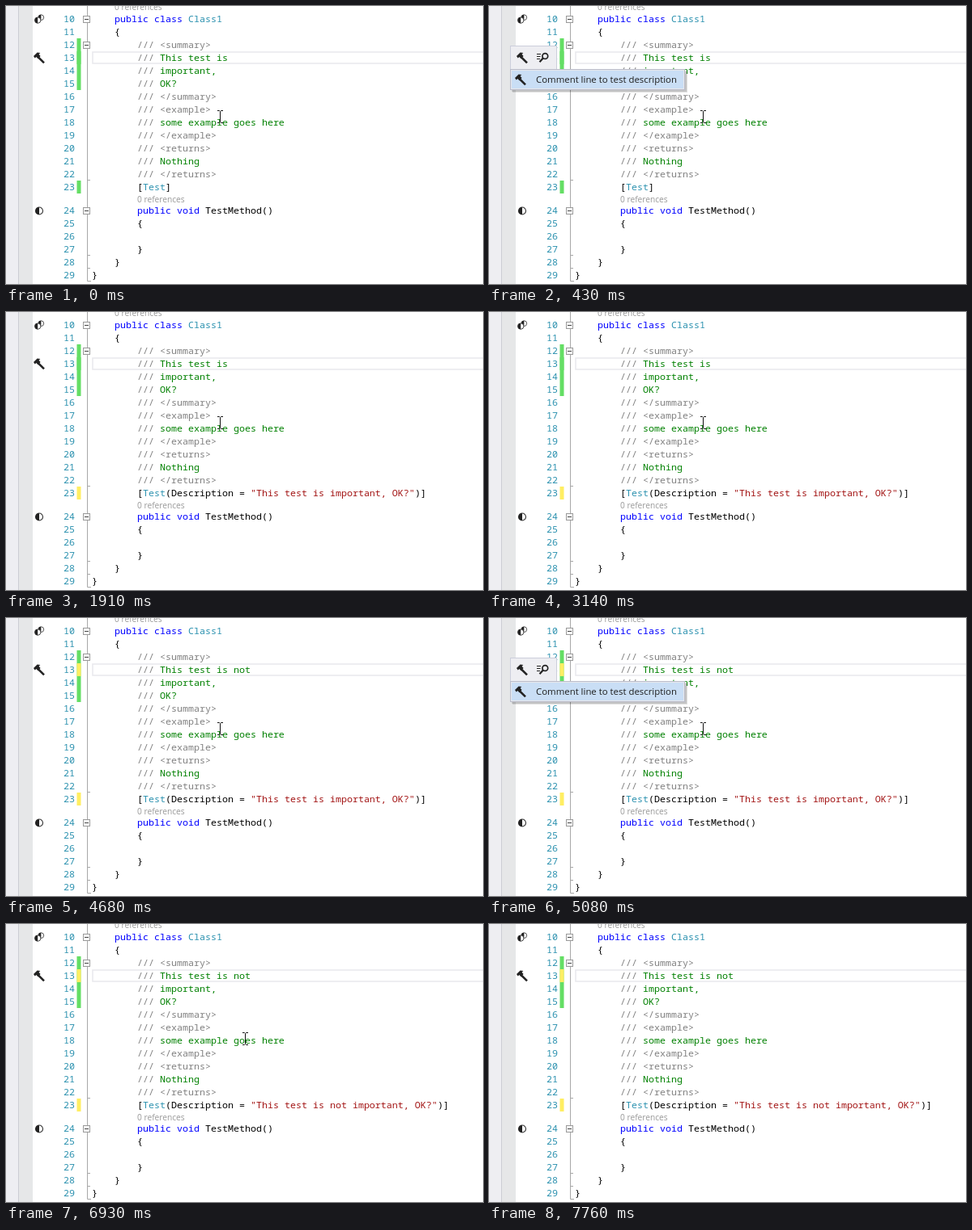
Write an HTML page that moves like this. It is 589x344 px and loops after 8.32 s.

```html
<!DOCTYPE html>
<html lang="en">
<head>
<meta charset="utf-8">
<title>Comment line to test description</title>
<style>
  html, body { margin: 0; width: 100%; height: 100%; overflow: hidden; background: #fff; }
  svg { display: block; }
  text { white-space: pre; }
  .code { font: 11.667px "Noto Sans Mono", "DejaVu Sans Mono", monospace; }
  .ui { font-family: "Open Sans", "Noto Sans", sans-serif; }
  .k { fill: #0000ff; }
  .t { fill: #2b91af; }
  .c { fill: #008000; }
  .x { fill: #808080; }
  .s { fill: #a31515; }
  .b { fill: #000; }
</style>
</head>
<body>
<svg width="589" height="344" viewBox="0 0 589 344">
  <defs>
    <g id="hammer">
      <path d="M40 63.5L47 70.3" stroke="#222" stroke-width="2.5" fill="none"/>
      <path d="M34 62L38.6 57.6L42.3 58L40.6 59.8L42.6 62L39.4 65.2L37.4 63L35.7 64.5Z" fill="#222"/>
    </g>
    <g id="half">
      <circle r="4.5" fill="#fff" stroke="#333" stroke-width="1.1"/>
      <path d="M0 -4.5A4.5 4.5 0 0 0 0 4.5Z" fill="#222"/>
    </g>
    <g id="fold">
      <rect x="-4" y="-4" width="8" height="8" fill="#fff" stroke="#999"/>
      <path d="M-2.5 0H2.5" stroke="#444"/>
    </g>
  </defs>

  <rect width="15" height="344" fill="#eeeef2"/>
  <rect x="15" width="1" height="344" fill="#cccdd4"/>
  <rect x="16" width="17" height="344" fill="#e6e7e8"/>

  <rect x="107" y="57" width="500" height="14" fill="none" stroke="#eaeaee" stroke-width="1.6"/>

  <path d="M100.5 0V340.5H105M100.5 215.5H104M100.5 308.5H104M100.5 324.5H104" fill="none" stroke="#a8a8a8"/>
  <use href="#fold" x="99.5" y="16.5"/>
  <use href="#fold" x="99.5" y="48.5"/>
  <use href="#fold" x="99.5" y="253.5"/>

  <use href="#half" x="41" y="253.5"/>
  <use href="#half" transform="translate(43.3 14.2) scale(.75)"/>
  <use href="#half" transform="translate(39.2 17.6) scale(.82)"/>

  <rect x="87.5" y="40" width="5" height="64" fill="#64de64"/>
  <rect id="bar13" x="87.5" y="56" width="5" height="16"/>
  <rect id="bar23" x="87.5" y="216" width="5" height="16"/>

  <g class="ui" font-size="10.2" fill="#999">
    <text x="134" y="5">0 references</text>
    <text x="162" y="243">0 references</text>
  </g>
  <g id="code" class="code"></g>
  <use id="mark" href="#hammer"/>
  <rect id="caret" y="56" width="1" height="15"/>

  <g id="popup">
    <rect x="29" y="81" width="216" height="26" fill="#000" opacity=".13"/>
    <rect x="28" y="80" width="216" height="26" fill="#000" opacity=".12"/>
    <rect x="26.5" y="49.5" width="57" height="30" fill="#eeeef2" stroke="#cccedb"/>
    <rect x="26.5" y="78.5" width="215" height="25" fill="#e7e8ec" stroke="#b9bccb"/>
    <rect x="28" y="80" width="212" height="22" fill="#c9def5"/>
    <use href="#hammer"/>
    <use href="#hammer" x="-2" y="27"/>
    <g fill="none" stroke="#222">
      <circle cx="69.3" cy="62" r="3.4" stroke-width="1.7"/>
      <path d="M66.8 64.6L62.5 69.3" stroke-width="2.2"/>
      <path d="M59 59.5H64M59 62.5H63.5M59 65.5H63"/>
    </g>
    <text class="ui" x="58" y="95" font-size="11.4" fill="#1e1e1e">Comment line to test description</text>
  </g>

  <path id="mouse" d="M0 .5H2.5L3.5 1.5L4.5 .5H7M3.5 1.5V14.5M0 15.5H2.5L3.5 14.5L4.5 15.5H7" fill="none" stroke="#111"/>
</svg>
<script>
const LOOP = 8320, COL = 7, LEFT = 106;
const GREEN = '#64de64', YELLOW = '#ffee62';
const $ = id => document.getElementById(id);

// Each line: [column, class, text] tokens.
const doc = (text, cls) => [[8, 'x', '///'], [12, cls, text]];
const lines = {
  10: [[4, 'k', 'public'], [11, 'k', 'class'], [17, 't', 'Class1']],
  11: [[4, 'b', '{']],
  12: doc('<summary>', 'x'),
  13: doc('', 'c'),
  14: doc('important,', 'c'),
  15: doc('OK?', 'c'),
  16: doc('</summary>', 'x'),
  17: doc('<example>', 'x'),
  18: doc('some example goes here', 'c'),
  19: doc('</example>', 'x'),
  20: doc('<returns>', 'x'),
  21: doc('Nothing', 'c'),
  22: doc('</returns>', 'x'),
  23: [],
  24: [[8, 'k', 'public'], [15, 'k', 'void'], [20, 'b', 'TestMethod()']],
  25: [[8, 'b', '{']],
  26: [],
  27: [[8, 'b', '}']],
  28: [[4, 'b', '}']],
  29: [[0, 'b', '}']]
};

const baseline = n => n < 24 ? 20 + 16 * (n - 10) : 257 + 16 * (n - 24);

function addText(parent, x, y, cls, str) {
  const el = document.createElementNS('http://www.w3.org/2000/svg', 'text');
  el.setAttribute('x', x);
  el.setAttribute('y', y);
  el.setAttribute('class', cls);
  el.textContent = str;
  parent.append(el);
  return el;
}

const addToken = (n, [col, cls, str]) =>
  addText($('code'), LEFT + COL * col, baseline(n), cls, str);

let comment;
for (const n in lines) {
  addText($('code'), 71, baseline(n), 't', n);
  for (const token of lines[n]) {
    const el = addToken(n, token);
    if (n === '13') comment = el;
  }
}

// The attribute line, without and with its description.
addToken(23, [8, 'b', '[']);
addToken(23, [9, 't', 'Test']);
const open = addToken(23, [13, 'b', '']);
const string = addToken(23, [28, 's', '']);
const close = addToken(23, [0, 'b', '']);

function setDescription(str) {
  open.textContent = str ? '(Description =' : ']';
  string.textContent = str && `"${str}"`;
  close.textContent = str && ')]';
  close.setAttribute('x', LEFT + COL * (30 + str.length));
}

// Steps: [start in ms, value].
const steps = {
  popup: [[0, false], [430, true], [1300, false], [5080, true], [6070, false]],
  mark: [[0, true], [3140, false], [4680, true]],
  bar13: [[0, GREEN], [3420, YELLOW]],
  bar23: [[0, GREEN], [1450, YELLOW]],
  comment: [[0, ''], [3420, ' '], [3690, ' n'], [3820, ' no'], [3940, ' not']],
  description: [[0, ''], [1450, 'This test is important, OK?'], [6190, 'This test is not important, OK?']],
  caret: [[0, 0], [1450, 232], [1910, 0], [2470, 232], [2860, 274], [2980, 0],
    [3690, 288], [3820, 295], [3940, 302], [4530, 0],
    [6190, 295], [6630, 0], [7180, 295], [7760, 0]],
  mouse: [[0, [261, 129]], [6930, [292, 134]], [7050, [372, 160]], [7180, [455, 210]],
    [7300, [511, 257]], [7450, [530, 309]], [7610, [558, 335]], [7760, null]]
};

const at = (name, t) => steps[name].findLast(([start]) => start <= t)[1];
const show = (id, on) => $(id).setAttribute('visibility', on ? 'visible' : 'hidden');

function render(t) {
  show('popup', at('popup', t));
  show('mark', at('mark', t));
  $('bar13').setAttribute('fill', at('bar13', t));
  $('bar23').setAttribute('fill', at('bar23', t));
  comment.textContent = 'This test is' + at('comment', t);
  setDescription(at('description', t));

  const caret = at('caret', t);
  show('caret', caret);
  $('caret').setAttribute('x', caret);

  const mouse = at('mouse', t);
  show('mouse', mouse);
  if (mouse) $('mouse').setAttribute('transform', `translate(${mouse})`);
}

const begin = performance.now();
function tick() {
  render((performance.now() - begin) % LOOP);
  requestAnimationFrame(tick);
}
tick();
</script>
</body>
</html>
```
